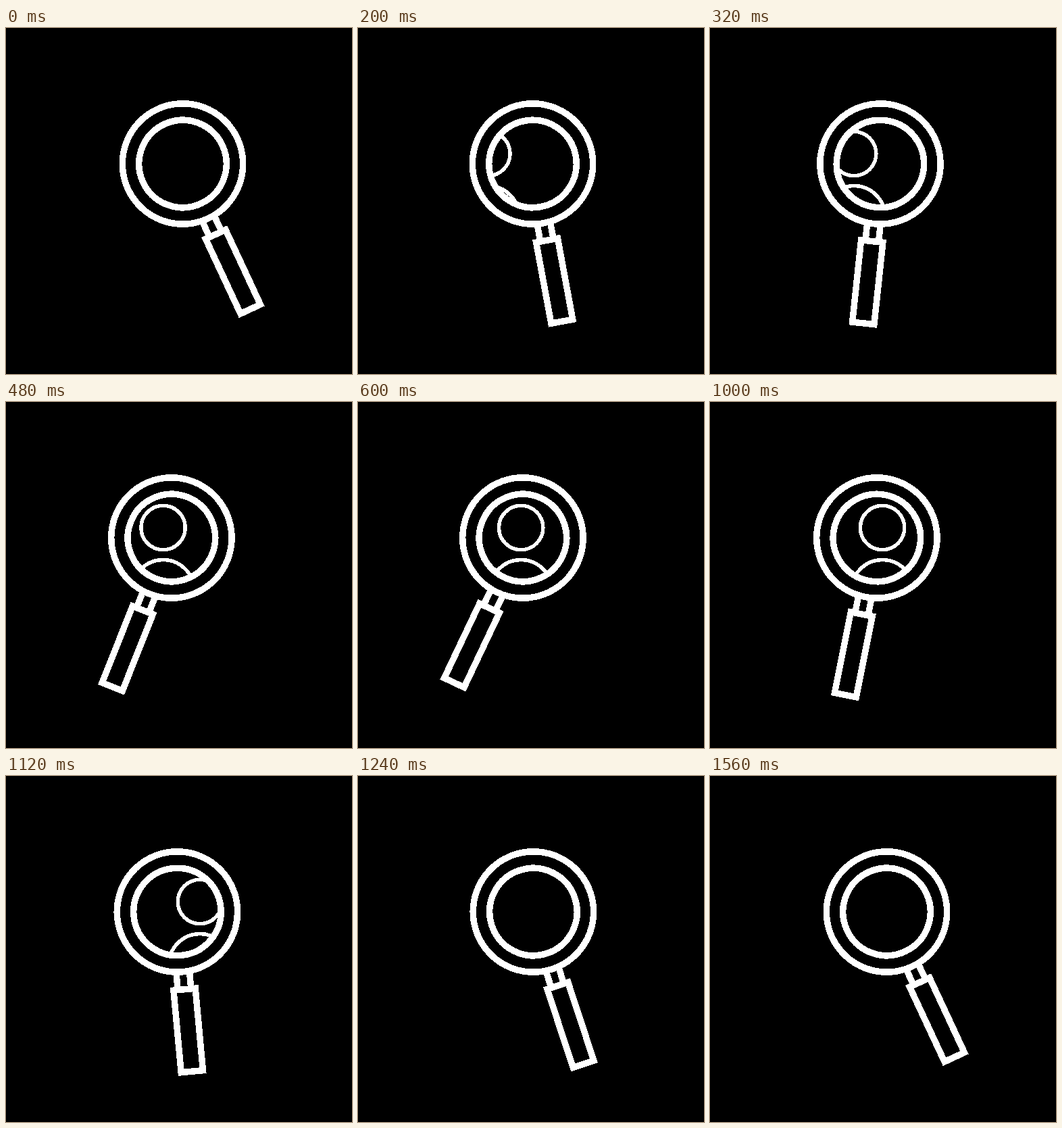
An HTML page that plays this animation: 512x512 px, repeating every 1600 ms.

```html
<!DOCTYPE html>
<html lang="en">
<head>
<meta charset="utf-8">
<title>Person search</title>
<style>
  html, body { margin: 0; width: 100%; height: 100%; overflow: hidden; background: #000; }
  svg { display: block; width: 100vw; height: 100vh; }
</style>
</head>
<body>
<svg viewBox="0 0 512 512" fill="none" stroke="#fff" shape-rendering="crispEdges">
  <defs>
    <clipPath id="glass"><circle id="hole" cy="201" r="65"/></clipPath>
  </defs>
  <g clip-path="url(#glass)">
    <g id="person" stroke-width="5.4">
      <circle cy="186" r="32.7"/>
      <circle cy="279.5" r="46"/>
    </g>
  </g>
  <g id="lens" stroke-width="9.5">
    <path d="M-9.8 88V115M9.8 88V115"/>
    <rect x="-16.2" y="115.2" width="32.4" height="122"/>
    <circle r="89.2"/>
    <circle r="64.7"/>
  </g>
</svg>
<script>
  const LOOP = 1600, HALF = LOOP / 2, STEP = 40;
  const [hole, person, lens] = ['hole', 'person', 'lens'].map(id => document.getElementById(id));

  const mix = (a, b, k) => a + (b - a) * k;
  // Quick start, long soft landing
  const ease = (x, a, b) => 1 - (1 - x ** a) ** b;

  function draw(ms) {
    const t = ms % LOOP;
    const back = t >= HALF;
    const x = (t % HALF) / HALF;
    const swing = ease(x, 2.1, 6);
    const slide = ease(x, 3, 11.8);

    const angle = mix(-25, 25.8, back ? 1 - swing : swing);
    const lensX = mix(261.5, 243.9, back ? 1 - slide : slide);
    // Person glides in from the left, then speeds away to the right
    const personX = 246 + (back ? 769 * x ** 3.2 : -101 * (1 - x) ** 2.2);

    hole.setAttribute('cx', lensX);
    person.setAttribute('transform', `translate(${personX} 0)`);
    lens.setAttribute('transform', `translate(${lensX} 201) rotate(${angle})`);
  }

  const start = performance.now();
  function tick() {
    const ms = performance.now() - start;
    draw(Math.floor(ms / STEP) * STEP);
    requestAnimationFrame(tick);
  }
  draw(0);
  requestAnimationFrame(tick);
</script>
</body>
</html>
```
